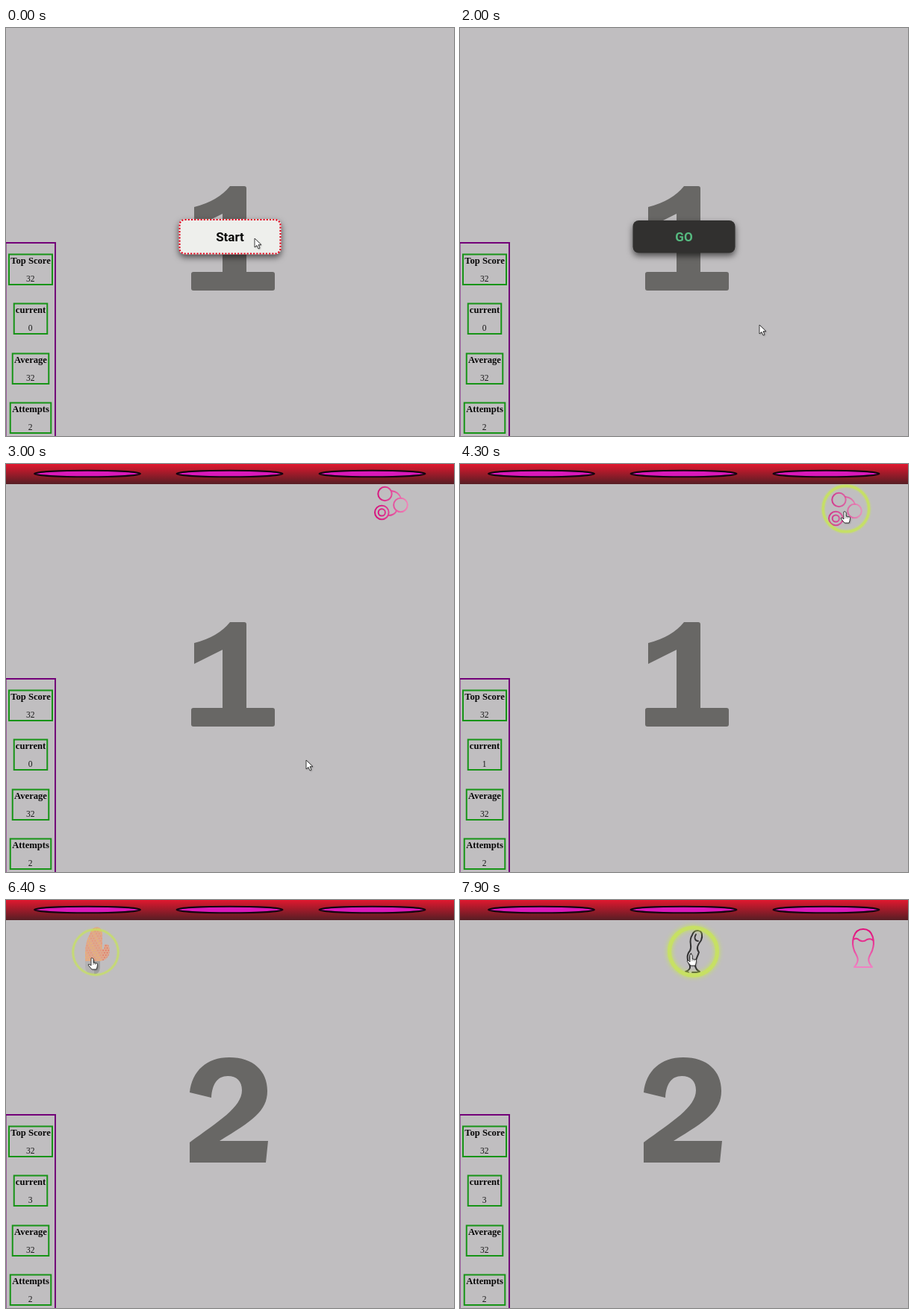
An HTML page with a canvas for the animation above (8 s loop, 600x547 px).

```html
<!DOCTYPE html>
<html lang="en">
<head>
<meta charset="utf-8">
<title>Reaction game</title>
<style>
html, body { margin: 0; width: 600px; height: 547px; overflow: hidden; background: #c0bec0; }
canvas { display: block; }
</style>
</head>
<body>
<canvas id="stage" width="600" height="547"></canvas>
<script>
const LOOP = 8000;
const c = document.getElementById('stage').getContext('2d');
const clamp = v => Math.max(0, Math.min(1, v));
const ramp = (t, a, b) => clamp((t - a) / (b - a));
const ease = p => p * p * (3 - 2 * p);
const mix = (a, b, p) => a + (b - a) * p;
const mixColor = (a, b, p) => `rgb(${a.map((v, i) => Math.round(mix(v, b[i], p))).join()})`;

function fill(path, color) {
  c.fillStyle = color;
  c.fill(new Path2D(path));
}

function stroke(path, color, width) {
  c.strokeStyle = color;
  c.lineWidth = width;
  c.stroke(new Path2D(path));
}

function circle(x, y, r) {
  c.beginPath();
  c.arc(x, y, r, 0, Math.PI * 2);
}

function label(text, x, y, font, color) {
  c.font = font;
  c.textAlign = 'center';
  c.fillStyle = color;
  c.fillText(text, x, y);
}

function gradient(x0, y0, x1, y1, from, to) {
  const g = c.createLinearGradient(x0, y0, x1, y1);
  g.addColorStop(0, from);
  g.addColorStop(1, to);
  return g;
}

const ONE = 'M252 240Q284 232 300 212H319Q322 212 322 215V327H357Q360 327 360 330V349Q360 352 357 352H251Q248 352 248 349V330Q248 327 251 327H290V249Q274 257 252 268Z';
const TWO = 'M246 258C249 229 269 211 299 211C331 211 350 229 350 256C350 283 330 296 286 323H351L348 352H246V325C284 297 316 278 316 255C316 243 309 236 297 236C283 236 276 247 275 265Z';

function drawScores(t) {
  const current = t < 4200 ? 0 : t < 4500 ? 1 : t < 6300 ? 2 : 3;
  const cells = [['Top Score', 32, 58], ['current', current, 44.5], ['Average', 32, 48.5], ['Attempts', 2, 54.5]];
  c.strokeStyle = '#720078';
  c.lineWidth = 2;
  c.strokeRect(-0.5, 288, 66.5, 300);
  cells.forEach(([name, value, width], i) => {
    const y = Math.round(i * 66.4);
    c.strokeStyle = '#179417';
    c.strokeRect(33 - width / 2, 303.5 + y, width, 40.5);
    label(name, 33, 316 + y, 'bold 12.6px "Liberation Serif", serif', '#080808');
    label(value, 32.7, 340 + y, '11.5px "Liberation Serif", serif', '#181818');
  });
}

function drawButton(t) {
  const alpha = 1 - ramp(t, 2480, 2750);
  if (!alpha) return;
  const dark = ease(ramp(t, 50, 500));
  const text = t < 700 ? 'Start' : t < 1300 ? 'READY' : t < 2000 ? 'SET' : 'GO';
  c.save();
  c.globalAlpha = alpha;
  c.shadowColor = 'rgba(0,0,0,.6)';
  c.shadowBlur = 8;
  c.shadowOffsetY = 4;
  c.fillStyle = mixColor([238, 239, 236], [49, 48, 47], dark);
  c.beginPath();
  c.roundRect(231.5, mix(256, 258, dark), 137, mix(47.5, 43.5, dark), 8);
  c.fill();
  c.shadowColor = 'transparent';
  if (dark < 1) {
    c.globalAlpha = alpha * (1 - dark);
    c.strokeStyle = '#e00a22';
    c.lineWidth = 2.2;
    c.setLineDash([2.2, 2]);
    c.beginPath();
    c.roundRect(232.5, 257, 135, 45.5, 7);
    c.stroke();
  }
  c.globalAlpha = alpha;
  label(text, 300, 286, 'bold 17px Roboto, sans-serif', mixColor([10, 10, 10], [86, 186, 128], dark));
  c.restore();
}

function drawHeader(t) {
  const alpha = ramp(t, 2450, 2800);
  if (!alpha) return;
  c.save();
  c.globalAlpha = alpha;
  c.fillStyle = gradient(0, 0, 0, 27, '#e0182f', '#561e24');
  c.fillRect(0, 0, 600, 27);
  for (const x of [109, 299.5, 490.5]) {
    c.beginPath();
    c.ellipse(x, 13, 71, 4.3, 0, 0, Math.PI * 2);
    c.fillStyle = '#da18ba';
    c.fill();
    c.strokeStyle = '#12040e';
    c.lineWidth = 2;
    c.stroke();
  }
  c.restore();
}

function drawRings() {
  const pink = gradient(497, 0, 538, 0, '#d6147e', '#f084b8');
  c.strokeStyle = pink;
  c.lineWidth = 2;
  for (const [x, y, r] of [[507.5, 48, 9.2], [528.5, 63, 9.3], [503.3, 73, 9.3], [503.3, 73, 4.6]]) {
    circle(x, y, r);
    c.stroke();
  }
  stroke('M516 44Q526 45 529 54M512 77Q520 77 523 71', pink, 2);
}

function drawCactus() {
  const body = 'M106 82V68Q107 55 112 46Q115 36 122 36Q130 37 129 50V66Q133 66 131 61Q132 58 137 60Q142 71 134 79Q130 82 126 82Z';
  fill(body, '#f49a6c');
  c.save();
  c.clip(new Path2D(body));
  for (let y = 38, row = 0; y < 82; y += 3.2, row++) {
    for (let x = 106 + (row % 2) * 1.8; x < 140; x += 3.6) {
      c.fillStyle = x > 129 ? '#e84a42' : (x + y) % 5 < 2.5 ? '#f6c552' : '#f08a66';
      c.fillRect(x, y, 1.5, 1.5);
    }
  }
  c.restore();
  fill('M106 82H126V91Q125 100 116 100Q106 99 106 89Z', '#aaa9a9');
  fill('M118 82H126V91Q125 99 118 100Z', '#939292');
  fill('M115.5 81H119V90H115.5Z', '#777');
}

function drawVase() {
  stroke('M310 96L316 82C311 81 306 75 312 66C321 56 309 52 317 42C322 39 326 41 324 49C323 57 317 59 320 66C322 73 314 80 315 88Q317 94 320 96M310 97H319M302 97H306M315 47Q313 52 318 55M309 72Q306 77 309 81',
    'transparent', 0);
  stroke('M302 96Q309 94 308 88C304 80 303 74 308 68C312 61 305 56 311 47Q313 41 318 41C325 40 325 49 323 54C318 61 316 65 320 70C318 77 314 82 315 88Q316 94 321 96',
    '#0b0b0b', 2);
  stroke('M301.5 97H306M311 97H321M316 46C313 51 315 55 319 55M309.5 72Q307 76 308 80', '#0b0b0b', 1.8);
}

function drawEgg(moving) {
  const pink = gradient(0, 38, 0, 91, '#e00c78', '#f083c4');
  if (moving) c.setLineDash([2.2, 0.7]);
  stroke('M528 90C537 80 531 75 528 68C524 57 526 39 540 39C554 39 556 57 552 68C549 75 543 80 552 90ZM527 53Q531 50 535 54Q540 57 545 53Q550 51 553 54', pink, 2.1);
  c.setLineDash([]);
}

// glow: start, full, start of fade, end of fade
const toys = [
  { draw: drawRings, x: 517, y: 60, enter: 2500, glow: [3850, 4100, 4200, 4400], leave: 4400 },
  { draw: drawCactus, x: 120, y: 70, enter: 5200, glow: [6000, 6200, 6300, 6450], leave: 6350 },
  { draw: drawVase, x: 312.5, y: 69, enter: 6600, glow: [7600, 7860, 9000, 9100], leave: 9000 },
  { draw: drawEgg, x: 540, y: 65, enter: 6600, glow: [9000, 9100, 9200, 9300], leave: 9000 }
];

function drawToy(toy, t) {
  if (t < toy.enter || t > toy.leave + 200) return;
  const drop = -62 * Math.pow(1 - ramp(t, toy.enter, toy.enter + 1300), 4.2);
  const [a, b, d, e] = toy.glow;
  const glow = ramp(t, a, b) * (1 - ramp(t, d, e));
  const hover = ramp(t, a, b);
  c.save();
  c.beginPath();
  c.rect(0, 27, 600, 520);
  c.clip();
  c.translate(0, drop);
  c.globalAlpha = (1 - hover * 0.22) * (1 - ramp(t, toy.leave, toy.leave + 200));
  c.lineCap = c.lineJoin = 'round';
  toy.draw(drop < -1);
  if (glow) {
    c.globalAlpha = Math.min(1, glow * 1.7);
    c.strokeStyle = '#c7e064';
    c.lineWidth = 1.5 + 3.5 * glow;
    c.shadowColor = '#c7ea4c';
    c.shadowBlur = 6 * glow;
    circle(toy.x, toy.y, 29.5 + 2.5 * glow);
    c.stroke();
  }
  c.restore();
}

// time, x, y of the pointer tip
const route = [
  [0, 333, 282], [950, 333, 282], [1300, 401, 398], [2400, 401, 398], [2600, 402, 397], [3100, 402, 397],
  [3950, 514, 64], [4850, 514, 64], [5500, 431, 148], [6050, 114, 78], [6600, 114, 78],
  [6800, 123, 73], [7100, 123, 73], [7700, 308, 73], [8000, 308, 73]
];

function drawPointer(t) {
  const i = Math.max(1, route.findIndex(p => p[0] > t));
  const [t0, x0, y0] = route[i - 1], [t1, x1, y1] = route[i];
  const p = ease(ramp(t, t0, t1));
  const overToy = toys.some(toy => t >= toy.glow[0] && t < toy.leave + 200);
  c.save();
  c.translate(mix(x0, x1, p), mix(y0, y1, p));
  c.shadowColor = 'rgba(0,0,0,.35)';
  c.shadowBlur = 2;
  c.shadowOffsetX = c.shadowOffsetY = 1;
  c.lineJoin = 'round';
  const shape = overToy
    ? 'M0 0Q2-1 3 1V6L8 7Q9 8 8 12L7 15H1L-4 9Q-4 7-1 9L0 10Z'
    : 'M0 0V12L3 9.5L5 14L7 13L5 8.7H9Z';
  fill(shape, '#fff');
  c.shadowColor = 'transparent';
  stroke(shape, '#292929', 0.9);
  if (overToy) stroke('M3 6V9M5.5 7V9', '#555', 0.7);
  c.restore();
}

function render(now) {
  const t = now % LOOP;
  c.fillStyle = '#c0bec0';
  c.fillRect(0, 0, 600, 547);
  fill(t < 4500 ? ONE : TWO, '#686765');
  drawScores(t);
  drawButton(t);
  toys.forEach(toy => drawToy(toy, t));
  drawHeader(t);
  drawPointer(t);
  requestAnimationFrame(render);
}

requestAnimationFrame(render);
</script>
</body>
</html>
```
